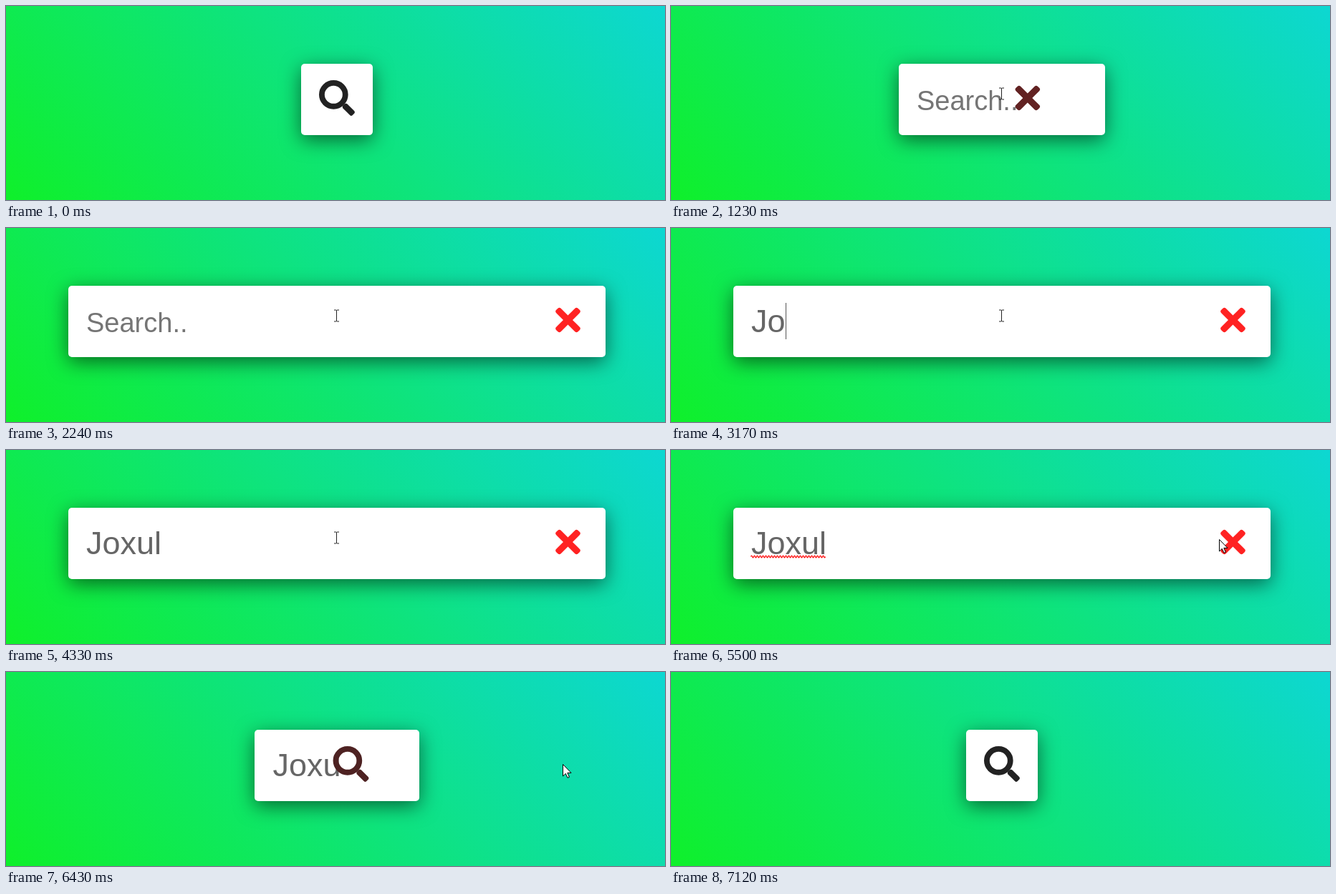
Write an HTML page that moves like this. It is 920 px wide and 272 px high and loops after 7.75 s.

```html
<!DOCTYPE html>
<html lang="en">
<head>
<meta charset="utf-8">
<title>Expanding search box</title>
<style>
  html, body { margin: 0; width: 100%; height: 100%; overflow: hidden; }
  body { position: relative; background: linear-gradient(45deg, #0ff02a, #0dd7d2); }
  #box {
    position: absolute; top: 81px; height: 100px;
    background: #fff; border-radius: 5px;
    box-shadow: 0 7px 28px rgba(0, 0, 0, .55);
  }
  #line {
    position: absolute; left: 25px; right: 110px; top: 24px; height: 52px;
    overflow: hidden; white-space: pre;
    font: 45px/52px "Liberation Sans", Arial, sans-serif; color: #666;
  }
  #hint { font-size: 38px; line-height: 1; color: #757575; }
  #caret {
    display: inline-block; width: 1px; height: 51px; margin-right: -1px;
    vertical-align: top; background: #555;
  }
  svg { position: absolute; left: 0; top: 0; }
</style>
</head>
<body>
<div id="box">
  <div id="line"><span id="word"></span><i id="caret"></i><span id="hint">Search..</span></div>
</div>
<svg width="920" height="272">
  <path id="wave" fill="none" stroke="#f00" stroke-width="1.2"/>
  <g id="icon">
    <g id="lens" transform="scale(.0977) translate(-256 -256)">
      <circle cx="208" cy="208" r="168" fill="none" stroke="currentColor" stroke-width="80"/>
      <path fill="currentColor" d="M372 336h16q10 0 17 7L505 443q14 17 0 34l-28 28q-17 14-34 0L343 405q-7-7-7-17V372Z"/>
    </g>
    <g id="cross" fill="currentColor">
      <rect x="-21.5" y="-4.6" width="43" height="9.2" rx="3.1" transform="rotate(45)"/>
      <rect x="-21.5" y="-4.6" width="43" height="9.2" rx="3.1" transform="rotate(-45)"/>
    </g>
  </g>
  <g id="mouse">
    <circle id="click" r="15" fill="#ff0" fill-opacity=".45"/>
    <path id="arrow" fill="#fff" stroke="#000" d="M.5.5V17L4.3 13.4 7 19.3 9.4 18.3 6.8 12.4H12Z"/>
    <path id="hand" fill="#fff" stroke="#000" stroke-linejoin="round"
      d="M-1.5 13V2Q-1.5.5 0 .5T1.5 2V8Q4.5 6.5 4.7 9 7.6 7.8 7.8 10 10.5 9.3 10.5 11.5V15Q10.5 18 8.5 21.5H-1Q-2 18-5 14.5-6 12-4 11.5-2.5 11.5-1.5 13Z"/>
    <path id="beam" fill="none" stroke="#222" d="M-3.5-8H-1Q0-8 0-7 0-8 1-8H3.5M0-7V7M-3.5 8H-1Q0 8 0 7 0 8 1 8H3.5"/>
  </g>
</svg>
<script>
  const $ = id => document.getElementById(id);
  const LOOP = 7750, WORD = 'Joxul';
  const KEYS = [2860, 3170, 3400, 3630, 3950];
  const CARET_ON = [[1690, 2240], [2790, 4330], [4960, 5500]];
  const OPEN = 1125, CLOSE = 6171, SPAN = 515;

  const clamp = v => Math.min(1, Math.max(0, v));
  const mix = (a, b, u) => a + (b - a) * u;
  const within = (t, a, b) => t >= a && t < b;
  const show = (el, on) => { el.style.display = on ? '' : 'none'; };

  const hold = (t, start, step) => start + Math.floor((t - start) / step) * step;
  const stepped = (t, start, step, count) => clamp((Math.floor((t - start) / step) + 1) / count);

  // cubic-bezier(.25, .1, .25, 1)
  function ease(x) {
    if (x <= 0) return 0;
    if (x >= 1) return 1;
    const curve = (s, a, b) => 3 * (1 - s) * (1 - s) * s * a + 3 * (1 - s) * s * s * b + s * s * s;
    let lo = 0, hi = 1;
    for (let i = 0; i < 24; i++) {
      const s = (lo + hi) / 2;
      if (curve(s, .25, .25) < x) lo = s; else hi = s;
    }
    return curve(lo, .1, 1);
  }

  function openness(t) {
    if (t < 1150) return 0;
    if (t < 5820) return ease((hold(t, 1150, 76.67) - OPEN) / SPAN);
    return 1 - ease((hold(t, 5820, 76) - CLOSE) / SPAN);
  }

  function pointer(t) {
    if (t < 300 || t >= 7110) return ['none', 0, 0];
    if (t < 680) {
      const u = 1 - (1 - Math.floor((t - 300) / 76) / 5) ** 1.6;
      return ['arrow', mix(673, 459, u), mix(226, 122, u)];
    }
    if (t < 1225) return ['hand', 459, 122];
    if (t < 4960) return ['beam', 461.5, 123];
    if (t < 5820) {
      const u = stepped(t, 4960, 77, 8);
      return [u < 1 ? 'beam' : 'arrow', mix(461.5, 765, u), mix(123, 125, u) + 33 * Math.sin(Math.PI * u)];
    }
    if (t < 6890) {
      const u = stepped(t, 5820, 76, 3);
      return [t < 6200 ? 'hand' : 'arrow', mix(765, 777, u), mix(125, 129, u)];
    }
    const u = stepped(t, 6890, 76, 4);
    return ['arrow', mix(777, 842, u), mix(129, 285, u)];
  }

  function draw(t) {
    const p = openness(t);
    const width = mix(100, 750, p), left = 462 - width / 2;
    $('box').style.left = left + 'px';
    $('box').style.width = width + 'px';

    const active = within(t, 1150, 6200);
    const red = Math.round(mix(34, 255, p));
    show($('cross'), active);
    show($('lens'), !active);
    $('icon').style.color = `rgb(${red},34,34)`;
    $('icon').setAttribute('transform', `translate(${left + width * mix(.5, .93, p)} 129)`);

    const typed = t < 6735 ? KEYS.filter(k => t >= k).length : 0;
    $('word').textContent = WORD.slice(0, typed);
    show($('hint'), !typed && t >= 1150 && t < 6735);
    show($('caret'), CARET_ON.some(([a, b]) => within(t, a, b)));
    show($('wave'), within(t, 5040, 6200));

    const [kind, x, y] = pointer(t);
    for (const id of ['arrow', 'hand', 'beam']) show($(id), id === kind);
    show($('click'), within(t, 1000, 1150) || within(t, 6048, 6200));
    $('mouse').setAttribute('transform', `translate(${x} ${y})`);
  }

  $('wave').setAttribute('d', 'M111.5 149.5' + 'q1-3 2 0t2 0'.repeat(26));

  const began = performance.now();
  function frame() {
    draw((performance.now() - began) % LOOP);
    requestAnimationFrame(frame);
  }
  frame();
</script>
</body>
</html>
```
